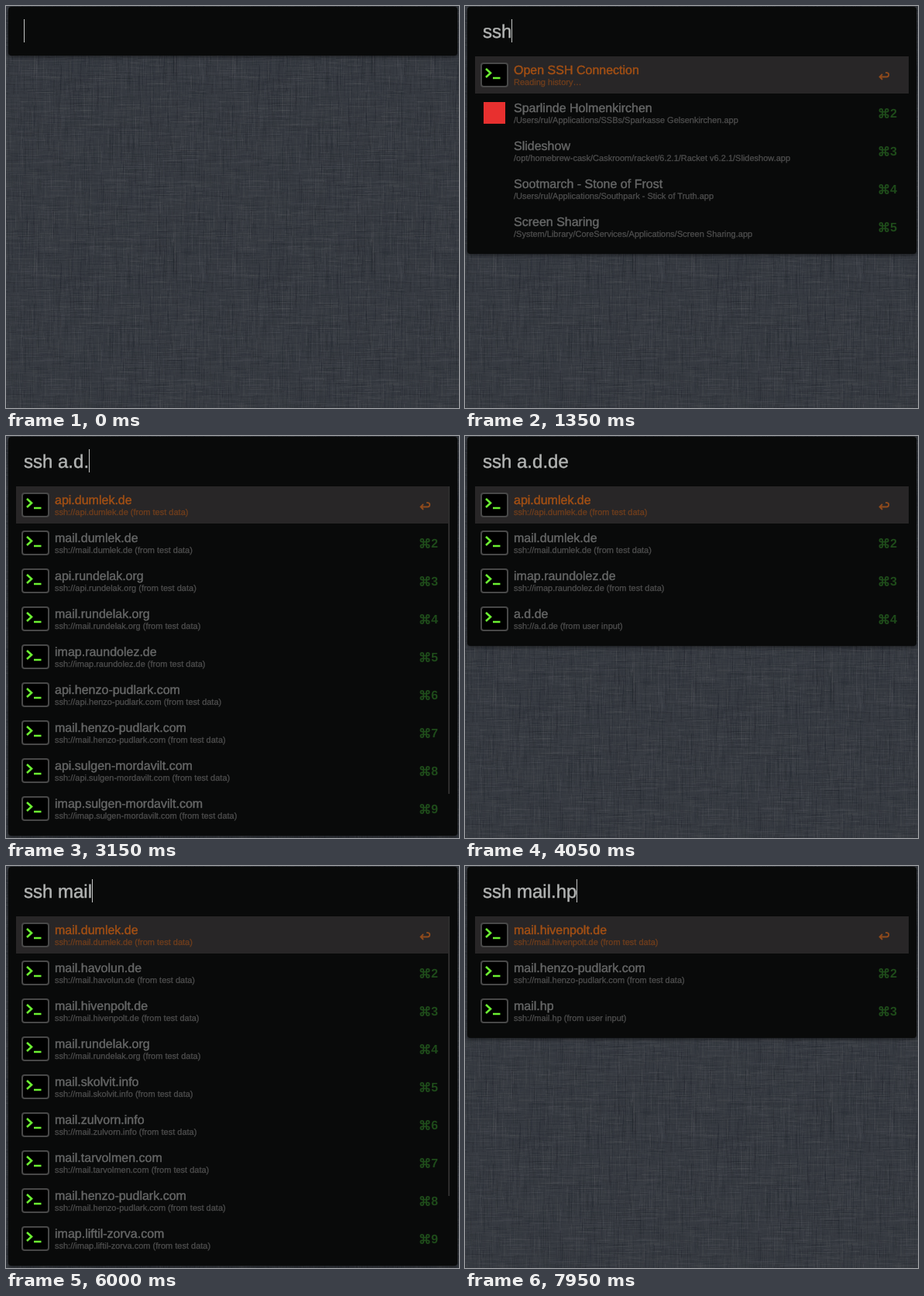
Recreate the animation shown at these times as an HTML page with a canvas. Size 585 by 519 pixels, loop 8000 ms.

```html
<!DOCTYPE html>
<html lang="en">
<head>
<meta charset="utf-8">
<title>SSH launcher</title>
<style>
  html, body { margin: 0; width: 100%; height: 100%; overflow: hidden; background: #363a41; }
  canvas, svg { position: absolute; left: 0; top: 0; }
  #panel {
    position: absolute; left: 3px; top: 1px; width: 580px; height: 63px;
    border-radius: 4px; background: #090a0a;
    box-shadow: 0 1px 5px rgba(0, 0, 0, .6);
  }
  text {
    font-family: "Liberation Sans", Arial, sans-serif;
    text-rendering: geometricPrecision; white-space: pre;
  }
  .query { font-size: 24px; fill: #b2b4b3; stroke: #b2b4b3; stroke-width: .45; }
  .title { font-size: 16px; fill: #666767; stroke: #666767; stroke-width: .4; }
  .sub { font-size: 11px; fill: #4d4d4d; stroke: #4d4d4d; stroke-width: .3; }
  .key { font-size: 16px; font-weight: bold; fill: #1e4a1a; }
  .sym { fill: none; stroke: #1e4a1a; stroke-width: 2; }
  .on .title { fill: #a45014; stroke: #a45014; }
  .on .sub { fill: #703e1c; stroke: #703e1c; }
  .on .sym { stroke: #8f4a1c; stroke-width: 1.8; }
</style>
</head>
<body>
<canvas id="linen" width="585" height="519"></canvas>
<div id="panel"></div>
<svg id="view" width="585" height="519"></svg>
<script>
const LOOP = 8000, ROW = 49, TOP = 65, MAX = 9;
const panel = document.getElementById('panel');
const view = document.getElementById('view');

// Woven background: a seeded tile of short threads
function drawLinen() {
  const size = 256;
  const tile = document.createElement('canvas');
  tile.width = tile.height = size;
  const c = tile.getContext('2d');
  let seed = 71;
  const rnd = () => (seed = seed * 16807 % 2147483647) / 2147483647;
  c.fillStyle = '#363a41';
  c.fillRect(0, 0, size, size);
  for (let i = 0; i < 5200; i++) {
    const across = rnd() < .5;
    const x = Math.floor(rnd() * size), y = Math.floor(rnd() * size);
    const len = 6 + rnd() * 34, a = .02 + rnd() * rnd() * .1;
    c.fillStyle = rnd() < .5 ? `rgba(134,134,136,${a})` : `rgba(12,16,24,${a * 1.25})`;
    const w = across ? len : 1, h = across ? 1 : len;
    for (const dx of [0, -size])
      for (const dy of [0, -size]) c.fillRect(x + dx, y + dy, w, h);
  }
  const g = document.getElementById('linen').getContext('2d');
  g.fillStyle = g.createPattern(tile, 'repeat');
  g.fillRect(0, 0, 585, 519);
}

const host = (name, from = 'test data') =>
  ({ title: name, sub: `ssh://${name} (from ${from})`, icon: 'term' });
const typed = name => host(name, 'user input');
const hosts = (prefix, names) => names.split(' ').map(n => host(`${prefix}.${n}`));
const list = (rows, total = rows.length) => ({ rows, total });

const apis = hosts('api', 'dumlek.de gurtilven.info havolun.de henzo-pudlark.com ' +
  'liftil-zorva.com rundelak.org ruspomen.de sulgen-mordavilt.com strulik.com');
const mails = hosts('mail', 'dumlek.de havolun.de hivenpolt.de rundelak.org ' +
  'skolvit.info zulvorn.info tarvolmen.com henzo-pudlark.com');
const [mDum, mHav, mHiv, mRun, mSko, , , mHenzo] = mails;
const imapLif = host('imap.liftil-zorva.com');
const imapWur = host('imap.wurtlik.org');
const imapRau = host('imap.raundolez.de');
const imapSul = host('imap.sulgen-mordavilt.com');

const lists = {
  none: list([]),
  apps: list([
    { title: 'Open SSH Connection', sub: 'Reading history…', icon: 'term' },
    { title: 'Sparlinde Holmenkirchen', sub: '/Users/rul/Applications/SSBs/Sparkasse Gelsenkirchen.app', icon: 'red' },
    { title: 'Slideshow', sub: '/opt/homebrew-cask/Caskroom/racket/6.2.1/Racket v6.2.1/Slideshow.app' },
    { title: 'Sootmarch - Stone of Frost', sub: '/Users/rul/Applications/Southpark - Stick of Truth.app' },
    { title: 'Screen Sharing', sub: '/System/Library/CoreServices/Applications/Screen Sharing.app' }
  ]),
  all: list(apis, 48),
  ad: list([apis[0], mDum, apis[5], mRun, imapRau, apis[3], mHenzo, apis[7], imapSul], 10),
  add: list([apis[0], mDum, imapRau, typed('a.d.d')]),
  adde: list([apis[0], mDum, imapRau, typed('a.d.de')]),
  m: list([...mails, imapLif], 30),
  mail: list([...mails, imapLif], 11),
  mailDot: list([...mails, imapWur], 11),
  mailH: list([mHav, mHiv, mHenzo, mDum, mRun, mSko, typed('mail.h')]),
  mailHp: list([mHiv, mHenzo, typed('mail.hp')])
};

// [start ms, query, list, caret shown]
const steps = [
  [0, '', 'none', 1],
  [450, '', 'none', 0],
  [1050, 's', 'none', 1],
  [1200, 'ss', 'apps', 1],
  [1350, 'ssh', 'apps', 1],
  [1500, 'ssh ', 'apps', 1],
  [1650, 'ssh ', 'all', 1],
  [1800, 'ssh a', 'all', 1],
  [2250, 'ssh a', 'all', 0],
  [2700, 'ssh a.', 'all', 1],
  [2850, 'ssh a.d', 'all', 1],
  [3000, 'ssh a.d', 'ad', 1],
  [3150, 'ssh a.d.', 'ad', 1],
  [3300, 'ssh a.d.d', 'ad', 1],
  [3450, 'ssh a.d.d', 'add', 1],
  [3600, 'ssh a.d.de', 'adde', 1],
  [4050, 'ssh a.d.de', 'adde', 0],
  [4500, 'ssh a.d.de', 'adde', 1],
  [4800, 'ssh a.d.d', 'add', 1],
  [4950, 'ssh a.d', 'ad', 1],
  [5100, 'ssh ', 'all', 1],
  [5550, 'ssh m', 'm', 1],
  [5700, 'ssh ma', 'm', 1],
  [5850, 'ssh mai', 'mail', 1],
  [6000, 'ssh mail', 'mail', 1],
  [6450, 'ssh mail', 'mail', 0],
  [6900, 'ssh mail.', 'mailDot', 1],
  [7350, 'ssh mail.', 'mailDot', 0],
  [7650, 'ssh mail.h', 'mailDot', 1],
  [7800, 'ssh mail.h', 'mailH', 1],
  [7950, 'ssh mail.hp', 'mailHp', 1]
];

const icons = {
  term: `<rect x="21" y="9" width="34" height="30" rx="3" fill="#000" stroke="#484848" stroke-width="2"/>
    <path d="M27 16l6 5.5-6 5.500M36 28h9.500" fill="none" stroke="#6cf032" stroke-width="2.600"/>`,
  red: '<rect x="24" y="10" width="28" height="28" fill="#e8302f"/>'
};
const command = 'M5 9V3a2 2 0 1 0-2 2h8a2 2 0 1 0-2-2v8a2 2 0 1 0 2-2H3a2 2 0 1 0 2 2z';
const enter = 'M535.500 26.500h9a2.700 2.700 0 0 0 0-5.400h-1.500M539 23l-3.500 3.500 3.500 3.500';

function rowMarkup(row, i) {
  const key = i
    ? `<path class="sym" transform="translate(534.5 18) scale(.93)" d="${command}"/><text class="key" x="549" y="30">${i + 1}</text>`
    : `<path class="sym" d="${enter}"/>`;
  return `<g transform="translate(0 ${TOP + i * ROW})"${i ? '' : ' class="on"'}>
    ${i ? '' : '<rect x="13" width="560" height="48" fill="#282627"/>'}
    ${icons[row.icon] || ''}
    <text class="title" x="63" y="23">${row.title}</text>
    <text class="sub" x="63" y="37">${row.sub}</text>${key}</g>`;
}

const ruler = document.createElement('canvas').getContext('2d');
ruler.font = '24px "Liberation Sans", Arial, sans-serif';
ruler.textRendering = 'geometricPrecision';

function show([, query, name, caret]) {
  const { rows, total } = lists[name];
  const bottom = rows.length ? TOP + rows.length * ROW + 10 : 64;
  panel.style.height = bottom - 1 + 'px';
  let out = `<text class="query" x="23" y="41">${query}</text>`;
  if (caret) {
    const x = Math.floor(23.1 + ruler.measureText(query).width);
    out += `<rect x="${x}" y="17" width="1" height="30" fill="#c4c6c5"/>`;
  }
  out += rows.map(rowMarkup).join('');
  if (total > MAX)
    out += `<rect x="571" y="${TOP}" width="2" height="${Math.round(MAX * MAX * ROW / total)}" fill="#2e2d2d"/>`;
  view.innerHTML = out;
}

let current;
function tick() {
  const t = performance.now() % LOOP;
  const step = steps.findLast(s => s[0] <= t);
  if (step !== current) show(current = step);
  requestAnimationFrame(tick);
}

drawLinen();
tick();
</script>
</body>
</html>
```
